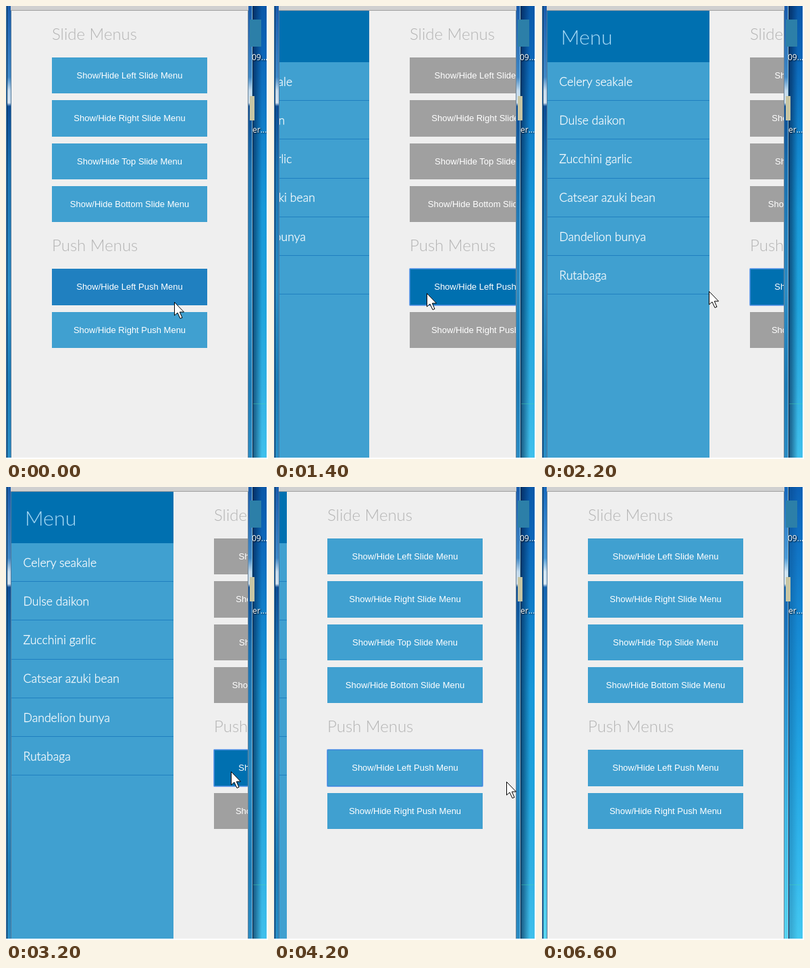
An HTML page that plays this animation: 388 px wide and 669 px high, repeating every 8.6 s.

```html
<!DOCTYPE html>
<html lang="en">
<head>
<meta charset="utf-8">
<title>Push menu</title>
<style>
  html, body { margin: 0; width: 100%; height: 100%; overflow: hidden; background: #fff; }
  div, h2, h3, svg { position: absolute; margin: 0; white-space: nowrap; }
  #stage { width: 386px; height: 667px; overflow: hidden; }

  /* Desktop behind the window */
  #desktop {
    inset: 0;
    background: linear-gradient(#0a58a8, #0c68ba 80px, #1284cc 200px, #1898d8 300px, #20a4dc 450px, #30b0e2 560px, #40c0ec);
  }
  #desktop::after {
    content: ""; position: absolute; left: 366px; right: 0; top: 587px; height: 1px;
    background: rgba(70, 215, 170, .4);
  }
  #shadow { left: 366px; width: 13px; height: 100%; background: linear-gradient(90deg, rgba(0, 22, 60, .6), transparent); }
  #icons { left: 361px; width: 25px; height: 200px; overflow: hidden; }
  .label { font: 12px/16px "Open Sans", sans-serif; color: #fff; text-shadow: 1px 1px 2px #000; }

  /* Window frame */
  .glass {
    top: 0; height: 100%; box-sizing: border-box;
    background: linear-gradient(#1a5cac, #3f88c6 105px, #c4daec 125px, #d0e0ee 143px,
      #0c4c94 148px, #1b70ae 240px, #2c8cc4 420px, #1c7cb6 560px, #2a8cc4);
  }
  #left { left: 0; width: 8px; border: solid #52789a; border-width: 0 1px 0 0; box-shadow: inset 1px 0 #4a90cc, inset 2px 0 #0c2c4c; }
  #right { left: 358px; width: 8px; border-left: 1px solid #6c8498; box-shadow: inset -1px 0 #0a2848, inset -2px 0 #8cc4e4; }
  #bar { left: 7px; width: 352px; height: 6px; background: #d0d0d0; border-bottom: 1px solid #a0a0a0; }
  .idle #desktop { background: linear-gradient(#0c60b4, #1070c2 70px, #1688d2 200px, #22a4e2 400px, #34b8ec 560px, #44c8f0); }
  .idle #shadow { opacity: .35; }
  .idle .glass {
    background: linear-gradient(#1668bc, #4c9cd8 105px, #d0e4f2 125px, #d8e8f4 143px,
      #1464b0 148px, #2890d0 300px, #40b8e4 480px, #58d4f0);
  }

  /* Page */
  #page { left: 8px; top: 7px; width: 350px; height: 660px; overflow: hidden; background: #efefef; }
  #content, #menu { top: 0; height: 100%; }
  #content { width: 350px; left: 0; }
  h2 { left: 60px; font: 300 24px/28.8px Lato, sans-serif; color: #b4b4b4; }
  .button {
    left: 60px; width: 230px; height: 53.33px; text-align: center; background: #40a0d0; color: #fff;
    font: 13px/53.33px "Liberation Sans", Arial, sans-serif;
  }
  .open .button { background: #a0a0a0; }
  .hover .toggle { background: #2080c0; }
  .open .toggle { background: #0070b0; }
  .focus .toggle { box-shadow: 0 0 0 1px #78a8ec, inset 0 0 0 1px #3c88d6; border-radius: 1px; }
  #menu { left: -240px; width: 240px; background: #40a0d0; font-family: Lato, sans-serif; }
  #menu h3 {
    position: static; height: 36px; padding: 20px; background: #0070b0; color: #a8daf6;
    font: 300 30.4px/36px Lato, sans-serif;
  }
  #menu div {
    position: static; height: 21px; padding: 17.9px 17.6px 17.3px; border-bottom: 1px solid #2080c0; color: #fff;
    font: 300 17.6px/21px Lato, sans-serif; -webkit-text-stroke: .3px #fff;
  }
</style>
</head>
<body>
<div id="stage">
  <div id="desktop"><div id="shadow"></div></div>
  <div class="glass" id="left"></div>
  <div class="glass" id="right"></div>
  <div id="icons">
    <div style="left:-23px; top:20px; width:40px; height:40px; background:#2c7fa8"></div>
    <div style="left:-29px; top:133px; width:36px; height:36px; background:#c8c6a4"></div>
    <div class="label" style="left:3px; top:68px">09...</div>
    <div class="label" style="left:4px; top:175px">er...</div>
  </div>
  <div id="bar"></div>
  <div id="page">
    <div id="content">
      <h2 style="top:20.3px">Slide Menus</h2>
      <h2 style="top:332.3px">Push Menus</h2>
    </div>
    <div id="menu"><h3>Menu</h3></div>
  </div>
  <svg id="cursor" width="18" height="28" viewBox="0 0 18 28" style="left:0; top:0">
    <path d="M.5 .5V20L5 16L9 24.5L12 23.3L8.3 15H14.5Z" fill="#fff" stroke="#000"/>
  </svg>
</div>
<script>
const LOOP = 8600, TICK = 200, SLIDE = 900, MENU_WIDTH = 240;
const OPEN_AT = 1111, CLOSE_AT = 3545, FOCUS_AT = 1000, CURSOR_GONE = 5000, IDLE_AT = 6600;
const CURSOR_PATH = [ // time, x, y
  [0, 249, 437], [1000, 226, 424], [1400, 226, 424], [2200, 247, 421],
  [2400, 293, 420], [3200, 333, 420], [3800, 333, 420], [4800, 361, 458], [LOOP, 361, 458]
];
const $ = id => document.getElementById(id);
const stage = $("stage"), content = $("content"), menu = $("menu"), cursor = $("cursor");

function add(parent, text, className, top) {
  const el = document.createElement("div");
  el.textContent = text;
  el.className = className;
  el.style.top = top + "px";
  parent.append(el);
}
["Left Slide", "Right Slide", "Top Slide", "Bottom Slide", "Left Push", "Right Push"].forEach((name, i) =>
  add(content, `Show/Hide ${name} Menu`, name === "Left Push" ? "button toggle" : "button",
    i < 4 ? 69 + i * 63.33 : 381.3 + (i - 4) * 63.5));
["Celery seakale", "Dulse daikon", "Zucchini garlic", "Catsear azuki bean", "Dandelion bunya", "Rutabaga"]
  .forEach(name => add(menu, name, "", 0));

// CSS "ease": cubic-bezier(.25, .1, .25, 1)
function ease(x) {
  if (x <= 0 || x >= 1) return x <= 0 ? 0 : 1;
  let lo = 0, hi = 1, s = .5;
  for (let i = 0; i < 24; i++) {
    s = (lo + hi) / 2;
    if (.75 * s * (1 - s) + s ** 3 < x) lo = s; else hi = s;
  }
  return .3 * s * (1 - s) ** 2 + 3 * s * s * (1 - s) + s ** 3;
}

function cursorAt(t) {
  const i = CURSOR_PATH.findIndex(point => point[0] > t);
  const [t0, x0, y0] = CURSOR_PATH[i - 1], [t1, x1, y1] = CURSOR_PATH[i];
  const k = (t - t0) / (t1 - t0);
  return [Math.round(x0 + (x1 - x0) * k), Math.round(y0 + (y1 - y0) * k)];
}

function render(time) {
  const t = Math.floor(time % LOOP / TICK) * TICK;
  const offset = Math.round(MENU_WIDTH * (ease((t - OPEN_AT) / SLIDE) - ease((t - CLOSE_AT) / SLIDE)));
  const [x, y] = cursorAt(t);
  const visible = t < CURSOR_GONE;
  content.style.transform = menu.style.transform = `translateX(${offset}px)`;
  cursor.style.transform = `translate(${x}px, ${y}px)`;
  cursor.style.display = visible ? "" : "none";
  stage.classList.toggle("open", t >= OPEN_AT && t < CLOSE_AT);
  stage.classList.toggle("hover", visible && x >= 68 + offset && x < 298 + offset && y < 442);
  stage.classList.toggle("focus", t >= FOCUS_AT && t < IDLE_AT);
  stage.classList.toggle("idle", t >= IDLE_AT);
}

const start = performance.now();
function loop() {
  render(performance.now() - start);
  requestAnimationFrame(loop);
}
loop();
</script>
</body>
</html>
```
